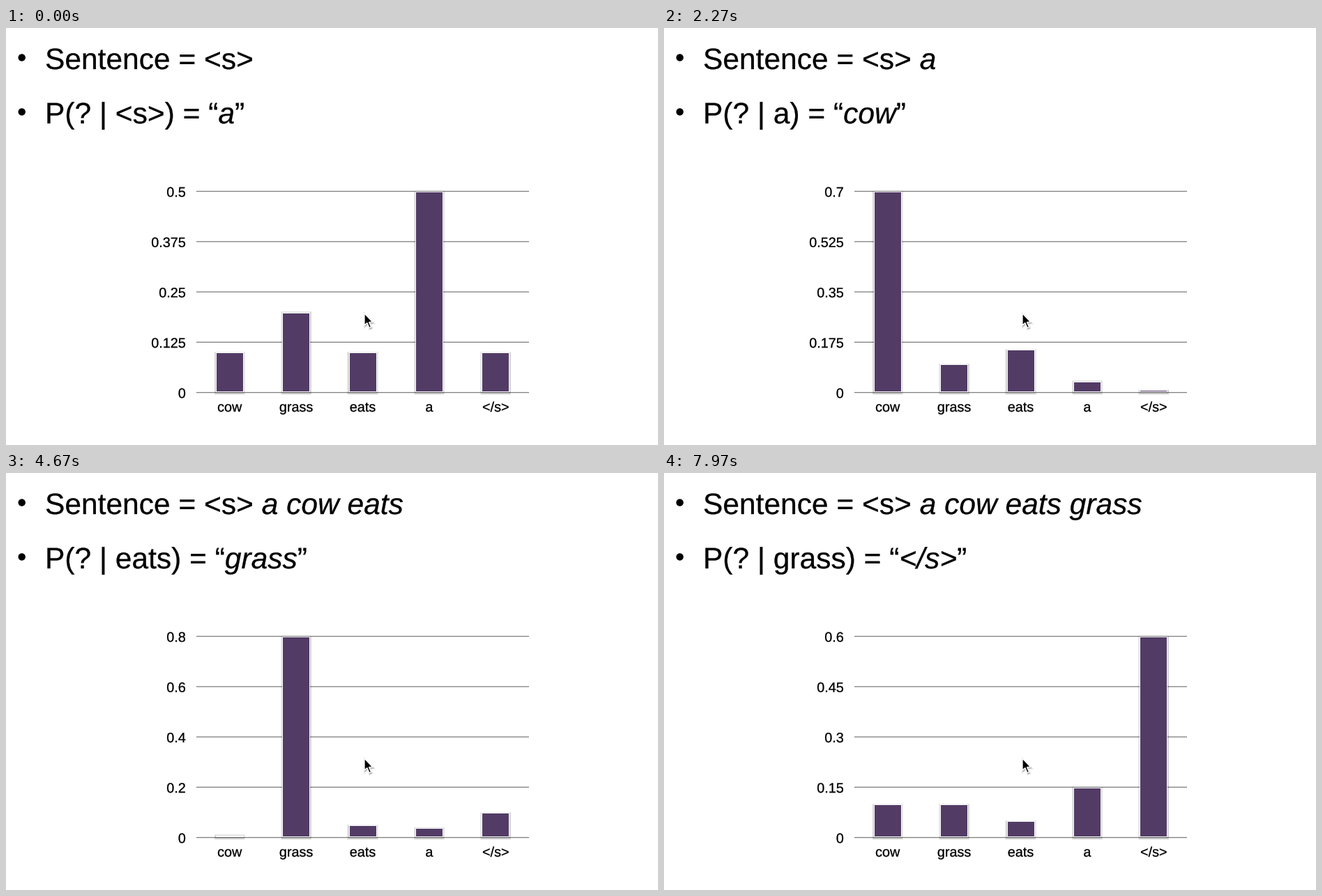
A matplotlib script that plays this animation: 935 px wide and 599 px high, repeating every 8 s.

```python
import matplotlib.pyplot as plt
from matplotlib.animation import FuncAnimation
from matplotlib.patches import Circle, PathPatch, Polygon, Rectangle
from matplotlib.textpath import TextPath
from matplotlib.transforms import Affine2D

W, H, DPI = 935, 599, 100
PX = 72 / DPI  # one pixel in points
INTERVAL, FRAMES = 40, 200

BIG, SMALL = 42.5, 19.8
LEFT, RIGHT, TOP, BOTTOM = 273, 750, 234.6, 523.6
BAR_WIDTH = 38
PURPLE, GRID = "#523c66", "#808080"

WORDS = ["cow", "grass", "eats", "a", "</s>"]

# start in ms, sentence so far, context word, predicted word, probabilities
SLIDES = [
    (0, "", "<s>", "a", [0.1, 0.2, 0.1, 0.5, 0.1]),
    (1560, "a", "a", "cow", [0.7, 0.1, 0.15, 0.04, 0.01]),
    (3120, "a cow", "cow", "eats", [0.2, 0.05, 0.6, 0.1, 0.05]),
    (4640, "a cow eats", "eats", "grass", [0.01, 0.8, 0.05, 0.04, 0.1]),
    (6280, "a cow eats grass", "grass", "</s>", [0.1, 0.1, 0.05, 0.15, 0.6]),
]

fig = plt.figure(figsize=(W / DPI, H / DPI), dpi=DPI, facecolor="white")
ax = fig.add_axes([0, 0, 1, 1])
ax.set_xlim(0, W)
ax.set_ylim(H, 0)
ax.axis("off")


def glyphs(text, size, style="normal"):
    font = {"family": "Liberation Sans", "style": style}
    return TextPath((0, 0), text, size=size, prop=font)


def advance(text, size, style="normal"):
    # A closing bar makes trailing spaces count.
    end = glyphs(text + "|", size, style).get_extents().x1
    return end - glyphs("|", size, style).get_extents().x1


def write(x, y, text, size, style="normal", align=0.0):
    """Draw text on baseline y and return the x where it ends."""
    width = advance(text, size, style)
    x -= align * width
    place = Affine2D().scale(1, -1).translate(x, y)
    path = place.transform_path(glyphs(text, size, style))
    patch = PathPatch(path, facecolor="black", edgecolor="black", lw=0.3 * PX)
    ax.add_patch(patch)
    return x + width, patch


def write_runs(x, y, runs):
    patches = []
    for text, style in runs:
        if text:
            x, patch = write(x, y, text, BIG, style)
            patches.append(patch)
    return patches


def box(x, y, w, h, color, alpha=1.0, z=3):
    patch = Rectangle((x, y), w, h, facecolor=color, alpha=alpha, lw=0, zorder=z)
    return ax.add_patch(patch)


def bar(index, share):
    center = LEFT + (RIGHT - LEFT) * (index + 0.5) / len(WORDS)
    x = center - BAR_WIDTH / 2
    top = BOTTOM - share * (BOTTOM - TOP) + 1.6
    height = BOTTOM - 1.3 - top
    patches = [
        box(x - g, top - g + 1, BAR_WIDTH + 2 * g, height + 2 * g, "black", 0.07)
        for g in (3.2, 2.4, 1.6)
    ]
    patches.append(box(x - 1, top - 1, BAR_WIDTH + 2, height + 2, "white"))
    patches.append(box(x, top, BAR_WIDTH, height, PURPLE))
    return patches


def slide(sentence, context, guess, shares):
    patches = write_runs(56, 59, [(sentence, "italic")] if False else [
        ("Sentence = <s> ", "normal"), (sentence, "italic")])
    patches += write_runs(56, 137, [
        (f"P(? | {context}) = “", "normal"), (guess, "italic"), ("”", "normal")])
    peak = max(shares)
    for i, share in enumerate(shares):
        patches += bar(i, share / peak)
    for k in range(5):
        y = BOTTOM + (TOP - BOTTOM) * k / 4
        patches.append(write(257.8, y + 7.8, f"{peak * k / 4:g}", SMALL, align=1)[1])
    return patches


def arrow(dx, dy, **style):
    points = [(513.9, 409.8), (513.9, 427.2), (517.8, 423.6), (520.9, 430.8),
              (523.7, 429.6), (520.6, 422.6), (525.9, 422.4)]
    ax.add_patch(Polygon([(x + dx, y + dy) for x, y in points], **style))


for k in range(5):
    y = BOTTOM + (TOP - BOTTOM) * k / 4
    ax.plot([LEFT, RIGHT], [y, y], color=GRID, lw=1.3 * PX, zorder=2,
            solid_capstyle="butt", snap=False)
for i, word in enumerate(WORDS):
    center = LEFT + (RIGHT - LEFT) * (i + 0.5) / len(WORDS)
    write(center, 551, word, SMALL, align=0.5)
for y in (42.5, 120.5):
    ax.add_patch(Circle((22.7, y), 5.2, facecolor="black", lw=0))
for spread in (1, 3):
    arrow(0.8, 1.6, facecolor="black", edgecolor="black", lw=spread * PX,
          alpha=0.12, zorder=5)
arrow(0, 0, facecolor="black", edgecolor="white", lw=1.5 * PX, zorder=6)

slides = [slide(*content) for _, *content in SLIDES]


def update(frame):
    now = frame * INTERVAL
    current = sum(start <= now for start, *_ in SLIDES) - 1
    for i, patches in enumerate(slides):
        for patch in patches:
            patch.set_visible(i == current)
    return []


anim = FuncAnimation(fig, update, frames=FRAMES, interval=INTERVAL,
                     init_func=lambda: update(0), repeat=True, repeat_delay=0)
plt.show()
```
